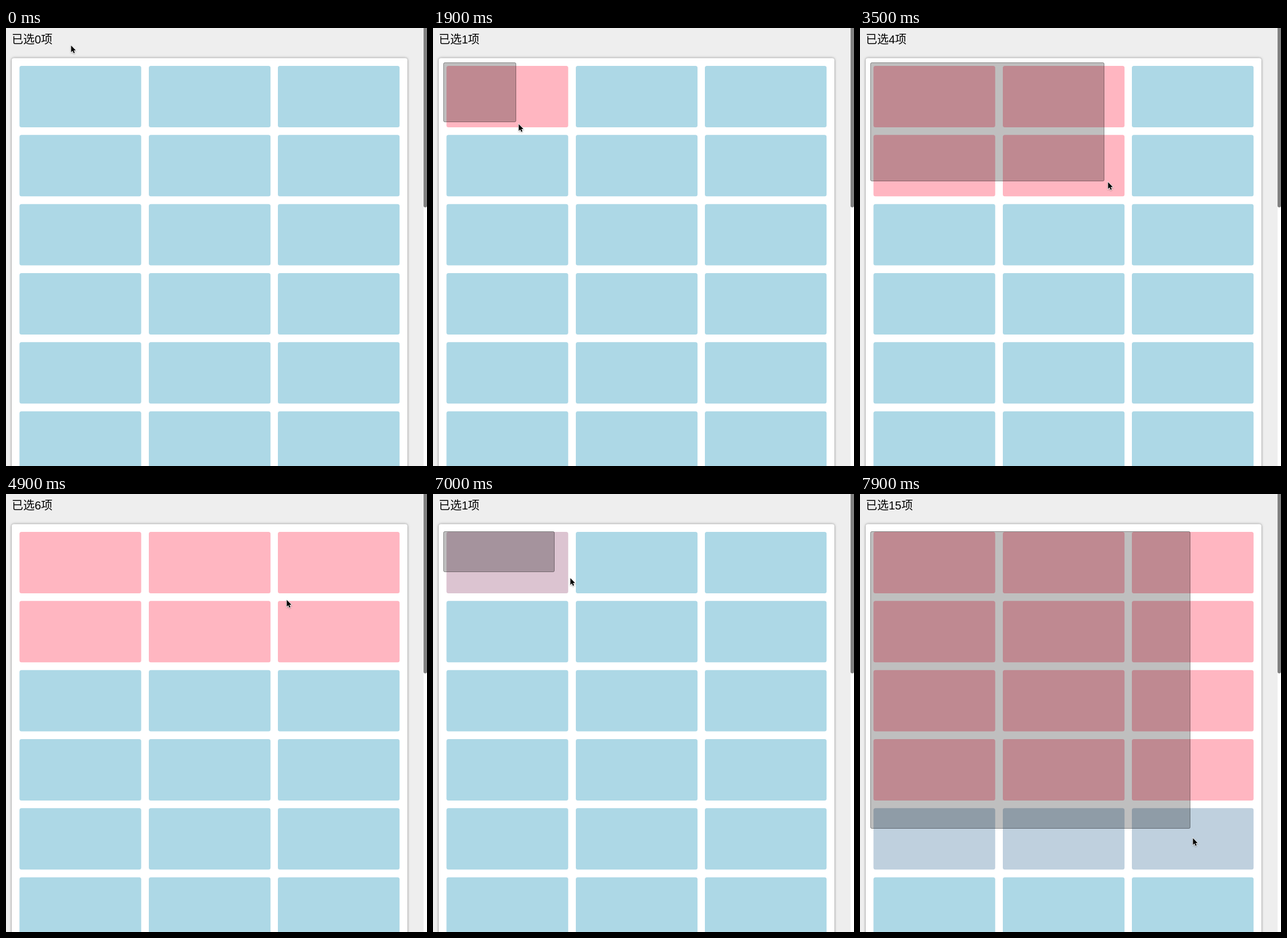
Write an HTML page that moves like this. It is 734 px wide and 763 px high and loops after 8 s.

```html
<!DOCTYPE html>
<html lang="zh">
<head>
<meta charset="utf-8">
<title>Drag selection</title>
<style>
  html, body { margin: 0; width: 100%; height: 100%; overflow: hidden; background: #eee; }
  svg { display: block; }
  text { font: 20px "Liberation Sans", "Noto Sans CJK SC", "Noto Sans CJK", sans-serif; }
</style>
</head>
<body>
<svg width="734" height="763" viewBox="0 0 734 763">
  <defs>
    <filter id="glow" x="-5%" y="-5%" width="110%" height="110%">
      <feDropShadow dx="0" dy="0" stdDeviation="2.2" flood-color="#808080"/>
    </filter>
    <filter id="shade" x="-50%" y="-50%" width="200%" height="200%">
      <feDropShadow dx="0" dy="1" stdDeviation="0.8" flood-opacity="0.4"/>
    </filter>
  </defs>
  <rect width="734" height="763" fill="#eee"/>
  <rect x="728" width="6" height="763" fill="#fff"/>
  <rect x="728" y="-10" width="6" height="322.5" rx="3" fill="#808080"/>
  <text id="label" x="10" y="27"></text>
  <rect x="10" y="52.6" width="689.8" height="800" rx="4" fill="#fff" filter="url(#glow)"/>
  <g id="cells"></g>
  <rect id="box" x="18.5" rx="2" fill="#000" fill-opacity=".25" stroke="#000" stroke-opacity=".4"/>
  <path id="arrow" d="M.5 .5V12.2L3.2 9.7L5 13.9L6.9 13.1L5.1 8.9H8.7Z" fill="#000"
        stroke="#fff" stroke-width="1.3" paint-order="stroke" filter="url(#shade)"/>
</svg>
<script>
const LOOP = 8000, TICK = 100, LAG = 25, FADE = 300;
const BLUE = [173, 216, 230], PINK = [255, 182, 193];
const drags = [
  { from: 1200, to: 4500, top: 60, cleared: 5755 },
  { from: 6900, to: LOOP, top: 65, cleared: LOOP }
];

// straight pointer moves: start, end, x, y; it rests in between
const moves = [
  [0, 500, 8, 59], [600, 900, 18, 60],
  [1100, 1900, 149, 167], [1900, 2400, 208, 238],
  [2500, 3500, 432, 268], [3500, 4100, 530, 265],
  [4400, 4900, 489, 184], [4900, 5500, 474, 176],
  [5600, 5900, 461, 176], [5900, 6500, 18, 65],
  [6800, 7100, 350, 186], [7100, 7400, 468, 391],
  [7400, 7810, 566, 540], [7810, 7900, 580, 599]
];

function pos(t) {
  let x = 113, y = 30;
  for (const [start, end, toX, toY] of moves) {
    if (t <= start) break;
    const u = Math.min(1, (t - start) / (end - start));
    x += (toX - x) * u;
    y += (toY - y) * u;
  }
  return [x, y];
}

// cubic-bezier(.25, .1, .25, 1)
function ease(x) {
  if (x <= 0) return 0;
  if (x >= 1) return 1;
  const curve = (s, a, b) => 3 * a * s * (1 - s) ** 2 + 3 * b * s * s * (1 - s) + s ** 3;
  let lo = 0, hi = 1;
  for (let i = 0; i < 20; i++) {
    const mid = (lo + hi) / 2;
    if (curve(mid, .25, .25) < x) lo = mid; else hi = mid;
  }
  return curve(lo, .1, 1);
}

// moment at which a drag first reaches a cell
function hitTime(drag, x, y) {
  for (let t = drag.from; t < drag.to; t += 5) {
    const [px, py] = pos(t - LAG);
    if (px > x && py > y) return t;
  }
  return Infinity;
}

const get = id => document.getElementById(id);
const label = get("label"), box = get("box"), arrow = get("arrow");

function set(node, attrs) {
  for (const name in attrs) node.setAttribute(name, attrs[name]);
}

const cells = Array.from({ length: 18 }, (_, i) => {
  const x = Math.round(46.8 + i % 3 * 450.7) / 2;
  const y = 66 + Math.floor(i / 3) * 120.33;
  const node = document.createElementNS("http://www.w3.org/2000/svg", "rect");
  set(node, { x, y, width: 212.2, height: 106.9, rx: 3.5 });
  get("cells").appendChild(node);
  return { node, hits: drags.map(d => hitTime(d, x, y)) };
});

function render(t) {
  let count = 0;
  for (const { node, hits } of cells) {
    let mix = 0;
    drags.forEach((d, i) => {
      if (t < hits[i]) return;
      if (t < d.cleared) count++;
      mix += ease((t - hits[i]) / FADE) - ease((t - d.cleared) / FADE);
    });
    const rgb = BLUE.map((c, i) => Math.round(c + (PINK[i] - c) * mix));
    set(node, { fill: `rgb(${rgb})` });
  }
  label.textContent = `已选${count}项`;

  const drag = drags.find(d => t >= d.from && t < d.to);
  box.style.display = drag ? "" : "none";
  if (drag) {
    const [x, y] = pos(t - LAG).map(Math.round);
    set(box, {
      y: drag.top + .5,
      width: Math.max(0, x - 19),
      height: Math.max(0, y - drag.top - 1)
    });
  }
  const [x, y] = pos(t).map(Math.round);
  set(arrow, { transform: `translate(${x} ${y})` });
}

const start = performance.now();
function frame() {
  const t = (performance.now() - start) % LOOP;
  render(Math.floor(t / TICK) * TICK);
  requestAnimationFrame(frame);
}
frame();
</script>
</body>
</html>
```
